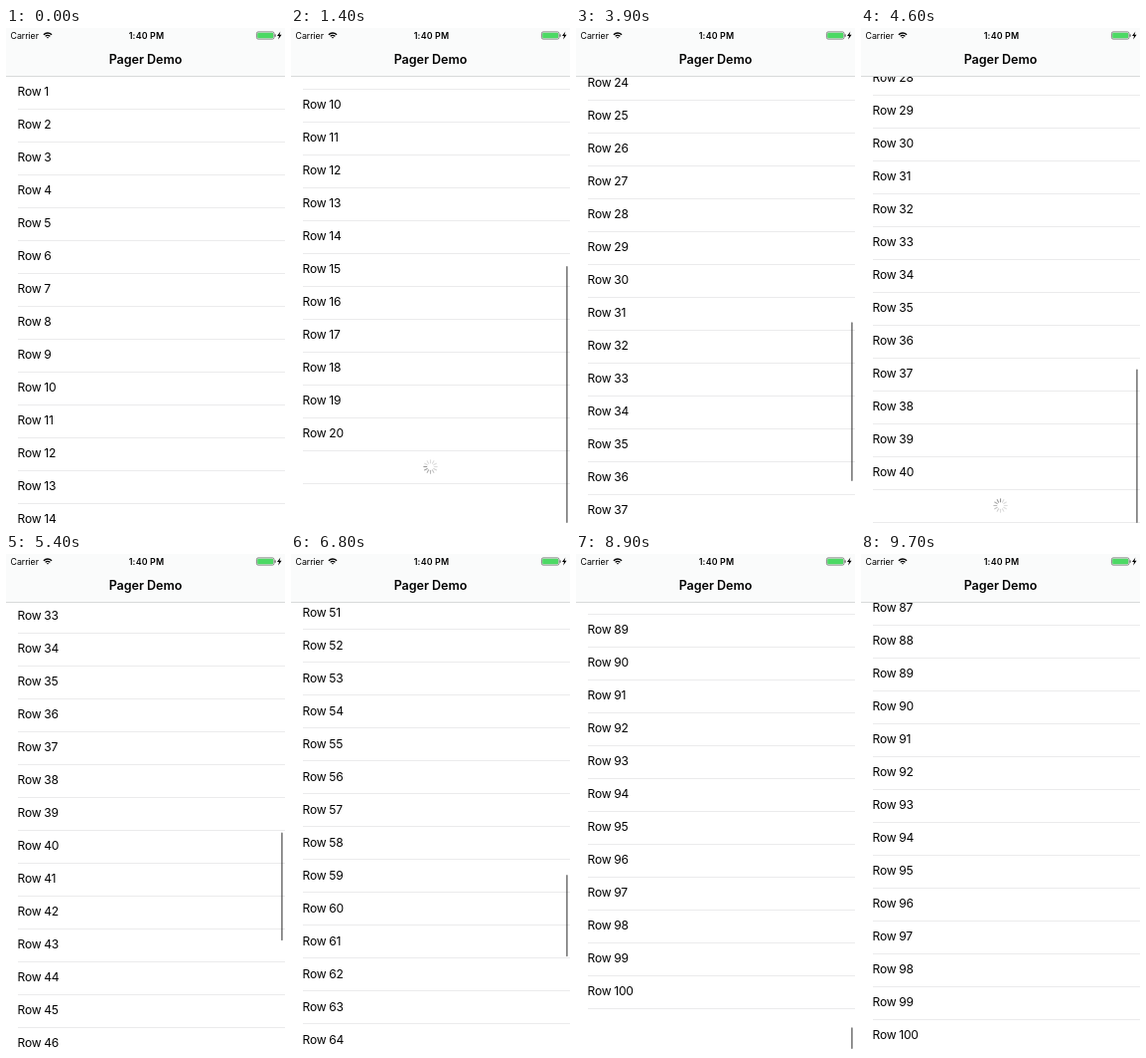
An HTML page with a canvas for the animation above (9.8 s loop, 281 by 500 pixels).

```html
<!DOCTYPE html>
<html lang="en">
<head>
<meta charset="utf-8">
<title>Pager Demo</title>
<style>
  html, body { margin: 0; width: 100%; height: 100%; overflow: hidden; background: #fff; }
  canvas { display: block; }
</style>
</head>
<body>
<canvas id="stage" width="281" height="500"></canvas>
<script>
const ctx = document.getElementById('stage').getContext('2d');
const WIDTH = 281, HEIGHT = 500, NAV = 48, ROW = 33, LAST = 100;
const LOOP = 9800, STEP = 100, BOUNCE = 500, OVERSHOOT = 44;

// Each flick scrolls to its rest offset; those that hit the end overshoot and bounce.
const flicks = [
  { start: 700, duration: 700, rest: 240, rows: 20 },
  { start: 2100, duration: 1450, rest: 610, rows: 40, glide: true },
  { start: 3610, duration: 600, rest: 900, rows: 40 },
  { start: 5180, duration: 700, rest: 1560, rows: 60 },
  { start: 6632, duration: 700, rest: 2222, rows: 80 },
  { start: 8200, duration: 700, rest: 2848, rows: LAST }
];

const clamp = u => Math.min(1, Math.max(0, u));
const ease = u => (1 - Math.cos(Math.PI * clamp(u))) / 2;
const flickAt = time => Math.max(0, flicks.findLastIndex(flick => time >= flick.start));

// New rows arrive just before the next flick.
const rowsAt = time => flicks[flickAt(time + 100)].rows;
const cellCount = rows => rows < LAST ? rows + 1 : rows;

function offsetAt(time) {
  const i = flickAt(time), { start, duration, rest, glide } = flicks[i];
  const from = i ? flicks[i - 1].rest : 0, over = glide ? 0 : OVERSHOOT;
  const elapsed = time - start;
  return from + (rest + over - from) * ease(elapsed / duration)
    - over * ease((elapsed - duration) / BOUNCE);
}

function text(string, x, y, size, weight, spacing, align = 'left') {
  ctx.font = `${weight} ${size}px Inter, sans-serif`;
  ctx.letterSpacing = spacing + 'px';
  ctx.textAlign = align;
  ctx.fillStyle = '#000';
  ctx.fillText(string, x, y);
}

function box(x, y, w, h, r, color) {
  ctx.fillStyle = color;
  ctx.beginPath();
  ctx.roundRect(x, y, w, h, r);
  ctx.fill();
}

function drawSpinner(x, y, time) {
  const head = Math.floor(time / 1000 * 12) + 5;
  ctx.lineWidth = 1.1;
  ctx.lineCap = 'round';
  for (let i = 0; i < 12; i++) {
    const angle = i * Math.PI / 6, dx = Math.sin(angle), dy = -Math.cos(angle);
    const age = (head - i + 12) % 12;
    ctx.strokeStyle = `rgba(120,120,120,${Math.max(0.25, 0.8 - age * 0.09)})`;
    ctx.beginPath();
    ctx.moveTo(x + dx * 3.8, y + dy * 3.8);
    ctx.lineTo(x + dx * 6.7, y + dy * 6.7);
    ctx.stroke();
  }
}

function drawRows(time, offset) {
  const rows = rowsAt(time), cells = cellCount(rows);
  for (let i = Math.max(0, Math.floor(offset / ROW)); i < cells; i++) {
    const top = NAV + i * ROW - offset;
    if (top > HEIGHT) break;
    if (i < rows) text('Row ' + (i + 1), 11.6, top + 20.4, 12.1, 400, -0.3);
    else drawSpinner(140.5, top + 16.5, time);
    box(12, Math.round(top + ROW), WIDTH - 12, 1, 0, '#ebebec');
  }
}

function drawScrollbar(time, offset) {
  if (time < 800) return;
  const total = NAV - 1 + cellCount(rowsAt(time - 200)) * ROW;
  const limit = total - HEIGHT, track = 447;
  const full = track * HEIGHT / total, length = full - Math.max(0, offset - limit);
  const end = Math.min(497, 50 + track * offset / total + full);
  const alpha = 0.48 * clamp((9600 - time) / 300);
  box(277, end - length, 1.8, length, 0.9, `rgba(0,0,0,${alpha})`);
}

function drawWifi(x, y) {
  const from = -Math.PI * 0.76, to = -Math.PI * 0.24;
  ctx.strokeStyle = '#000';
  ctx.lineWidth = 1.3;
  ctx.lineCap = 'butt';
  for (const r of [3.2, 5.6]) {
    ctx.beginPath();
    ctx.arc(x, y, r, from, to);
    ctx.stroke();
  }
  ctx.fillStyle = '#000';
  ctx.beginPath();
  ctx.moveTo(x, y);
  ctx.arc(x, y, 1.6, from, to);
  ctx.fill();
}

function drawBattery() {
  ctx.strokeStyle = '#555';
  ctx.lineWidth = 0.7;
  ctx.beginPath();
  ctx.roundRect(252.4, 3.9, 17.6, 7.2, 1.6);
  ctx.stroke();
  box(253.2, 4.7, 16, 5.6, 1, '#4cd964');
  box(270.6, 6.2, 1, 2.6, 0.5, '#444');
  ctx.fillStyle = '#000';
  ctx.fill(new Path2D('M276.4 3.6L273 8H275L274.2 11.4L277.6 6.8H275.5Z'));
}

function drawHeader() {
  box(0, 0, WIDTH, NAV, 0, '#fafbfb');
  box(0, NAV, WIDTH, 1, 0, '#d8dada');
  text('Carrier', 4.5, 10.7, 8.8, 400, -0.05);
  drawWifi(42, 10.6);
  text('1:40 PM', 141.5, 10.7, 8.8, 600, 0.2, 'center');
  drawBattery();
  text('Pager Demo', 140.5, 36, 12.5, 600, 0, 'center');
}

function draw(now) {
  const time = Math.floor(now % LOOP / STEP) * STEP;
  const offset = offsetAt(time);
  box(0, 0, WIDTH, HEIGHT, 0, '#fff');
  drawRows(time, offset);
  drawScrollbar(time, offset);
  drawHeader();
}

let start;
function tick(now) {
  start ??= now;
  draw(now - start);
  requestAnimationFrame(tick);
}
requestAnimationFrame(tick);
</script>
</body>
</html>
```
